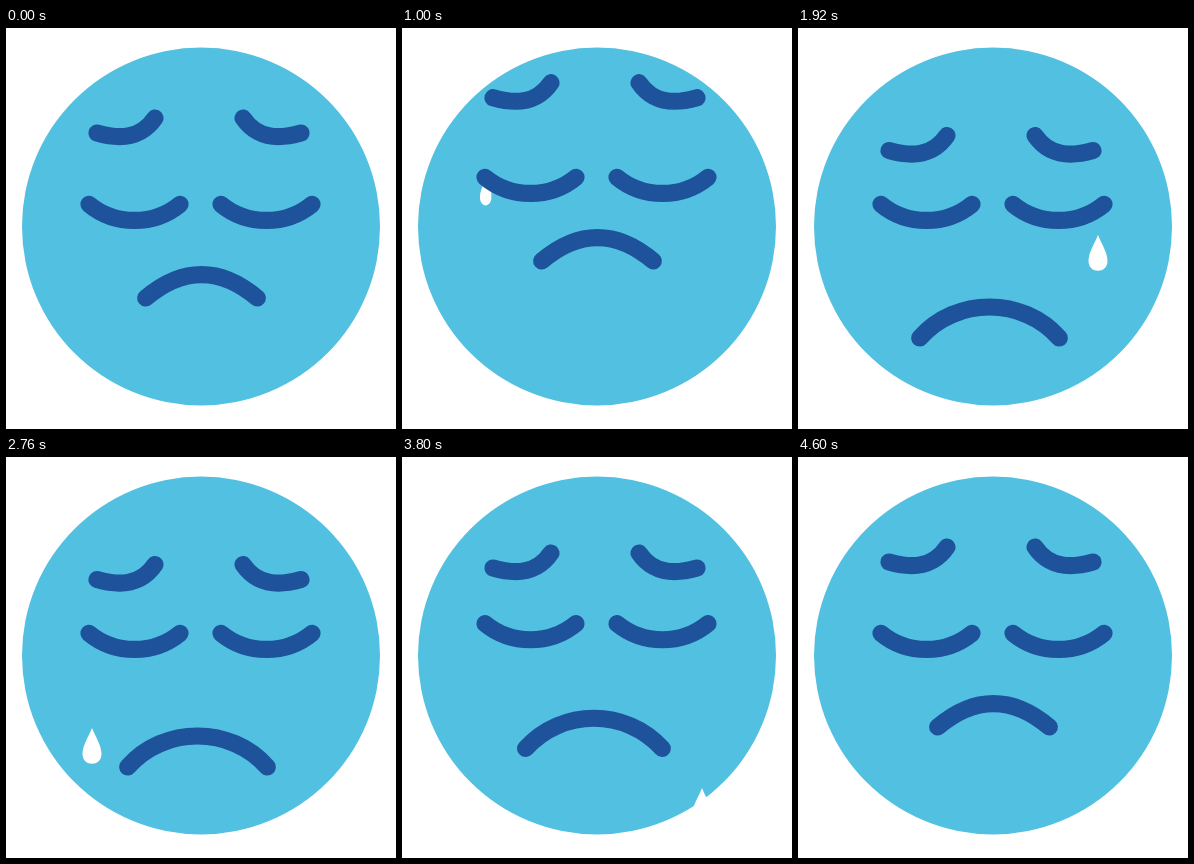
Animation of 390x401 px, one loop 4760 ms. Source, as an HTML page with a canvas:

```html
<!DOCTYPE html>
<html lang="en">
<head>
<meta charset="utf-8">
<title>Crying face</title>
<style>
  html, body { margin: 0; width: 100%; height: 100%; overflow: hidden; background: #fff; }
  canvas { display: block; }
</style>
</head>
<body>
<canvas id="stage" width="390" height="401"></canvas>
<script>
const ctx = document.getElementById('stage').getContext('2d');
const LOOP = 4760, STEP = 40;
const SKY = '#52c0e0', NAVY = '#1e529b';
const TEAR_STARTS = [240, 950, 1720, 2400, 3290, 3948]; // right and left in turn

const clamp = v => Math.min(1, Math.max(0, v));

function ease(t, start, end) {
  const p = clamp((t - start) / (end - start));
  return p * p * (3 - 2 * p);
}

// Rises from 0 to 1 between a and b, falls back between c and d.
const swell = (t, a, b, c, d) => ease(t, a, b) - ease(t, c, d);

// A symmetric curve; a negative rise makes it hang.
function arch(x, y, half, inner, rise) {
  const top = y - rise * 4 / 3;
  ctx.beginPath();
  ctx.moveTo(x - half, y);
  ctx.bezierCurveTo(x - inner, top, x + inner, top, x + half, y);
  ctx.stroke();
}

// Offsets run outwards from the middle of the face.
function brow(side, y) {
  const x = offset => 193 + side * offset;
  ctx.beginPath();
  ctx.moveTo(x(44), y);
  ctx.bezierCurveTo(x(59), y + 22, x(81), y + 21, x(102), y + 15);
  ctx.stroke();
}

function tear(age, side, lidY) {
  if (age < 0 || age > 690) return;
  const grow = clamp((age - 50) / 80);
  const size = 0.85 + 0.15 * grow;
  const edge = 4 + 5.5 * grow;
  ctx.save();
  ctx.beginPath();
  ctx.rect(0, lidY, 390, 401);
  ctx.clip();
  ctx.translate(193 + side * 107, 127 + 0.4 * age);
  ctx.scale(-side * size, size);
  ctx.beginPath();
  ctx.moveTo(0, 0);
  ctx.bezierCurveTo(-3, 8, -9.5, 17, -9.5, 26);
  ctx.bezierCurveTo(-9.5, 39, edge, 39, edge, 26);
  ctx.bezierCurveTo(edge, 17, 3, 8, 0, 0);
  ctx.fillStyle = '#fff';
  ctx.fill();
  ctx.restore();
}

function draw(now) {
  const t = Math.floor((now % LOOP) / STEP) * STEP;
  const lift = -27 * (swell(t, 160, 720, 1000, 1400) + swell(t, 3610, 4080, 4270, 4600));
  const sadness = swell(t, 1000, 1480, 3700, 4200);
  const browY = 90 + lift - 19 * swell(t, 660, 860, 860, 1250) + 17.5 * swell(t, 860, 1250, 3700, 4200);
  const mouthY = 270 + lift - 10 * swell(t, 660, 860, 1000, 1300) + 40 * swell(t, 1000, 1480, 3625, 4200);
  const eyeY = 176.3 + lift;

  ctx.fillStyle = '#fff';
  ctx.fillRect(0, 0, 390, 401);
  ctx.fillStyle = SKY;
  ctx.beginPath();
  ctx.arc(195, 198.5, 179, 0, Math.PI * 2);
  ctx.fill();

  TEAR_STARTS.forEach((start, i) => tear(t - start, i % 2 ? -1 : 1, eyeY));

  ctx.strokeStyle = NAVY;
  ctx.lineWidth = 17.2;
  ctx.lineCap = 'round';
  for (const side of [-1, 1]) {
    brow(side, browY);
    arch(194.5 + side * 66, eyeY, 45.5, 19.5, -16.1);
  }
  arch(195.5 - 4 * sadness, mouthY, 55.8 + 14 * sadness, 19 + 14.5 * sadness, 23.5 + 7.5 * sadness);
}

const begin = performance.now();
function frame() {
  draw(performance.now() - begin);
  requestAnimationFrame(frame);
}
frame();
</script>
</body>
</html>
```
